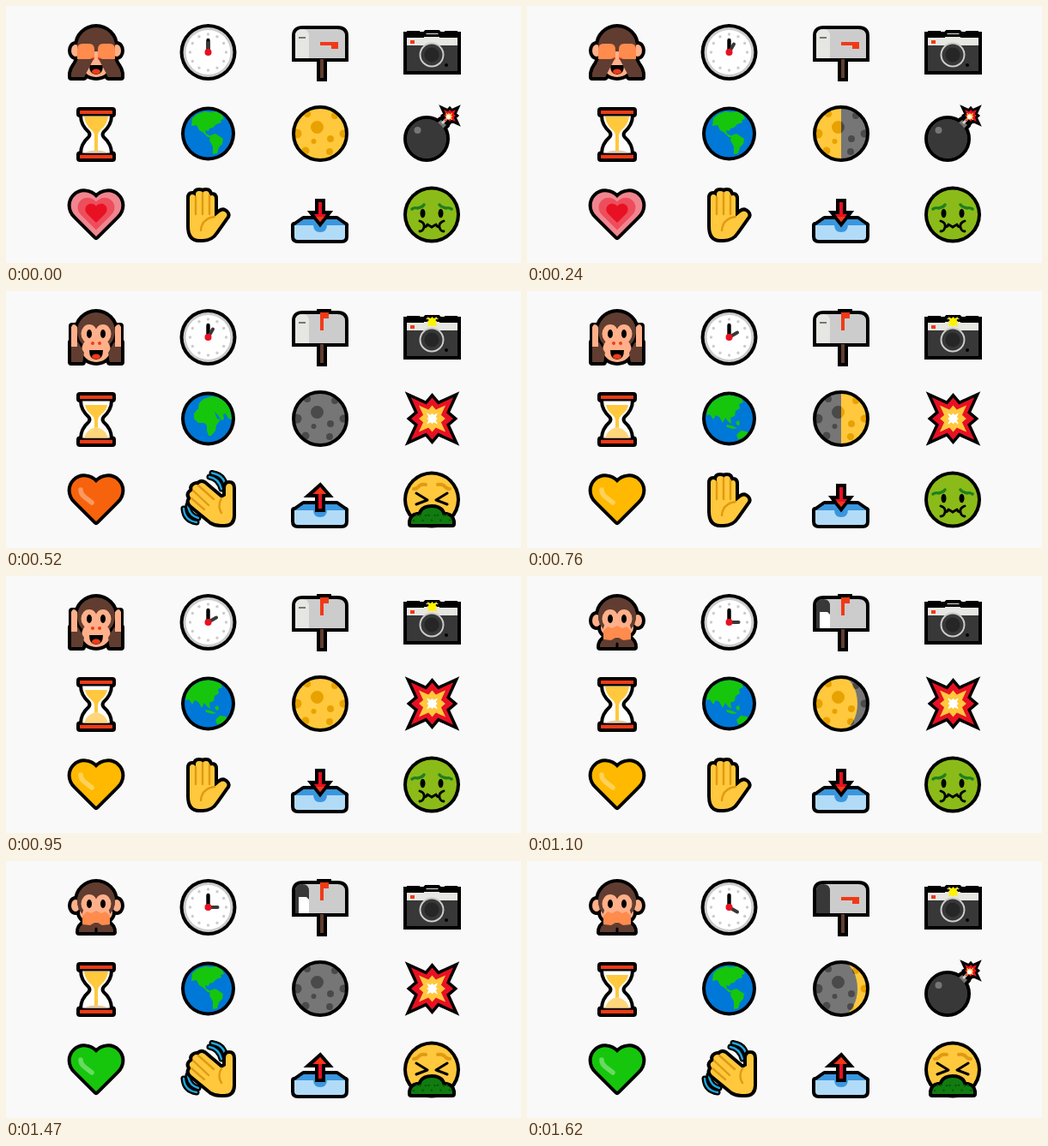
Write an HTML page that moves like this. It is 600 by 300 pixels and loops after 1710 ms.

```html
<!DOCTYPE html>
<html lang="en">
<head>
<meta charset="utf-8">
<title>Emoji cycles</title>
<style>
html, body { margin: 0; width: 100%; height: 100%; overflow: hidden; background: #f9f9f9; }
svg { display: block; width: 600px; height: 300px; }
</style>
</head>
<body>
<svg id="stage" viewBox="0 0 600 300" xmlns="http://www.w3.org/2000/svg"></svg>
<script>
const LOOP = 1710;
const RED = '#e81123', SCARLET = '#f03a17', YELLOW = '#ffc83d', AMBER = '#e09a12';
const GREEN = '#16c60c', DARK = '#383838', GREY = '#ccc', PALE = '#e6e6e2';
const BROWN = '#603d30', PEACH = '#ffb08a', ORANGE = '#ff8b4d', BLUE = '#0078d7';

// Path and markup helpers
const oval = (x, y, rx, ry = rx) =>
  `M${x - rx} ${y}a${rx} ${ry} 0 1 0 ${2 * rx} 0a${rx} ${ry} 0 1 0 ${-2 * rx} 0z`;
const box = (x, y, w, h) => `M${x} ${y}h${w}v${h}h${-w}z`;
const fill = (d, color, attrs = '') => `<path d="${d}" fill="${color}" ${attrs}/>`;
const line = (d, color, width, cap = 'round') =>
  `<path d="${d}" fill="none" stroke="${color}" stroke-width="${width}" stroke-linecap="${cap}" stroke-linejoin="round"/>`;
const inked = (parts, width = 8, join = 'round') =>
  parts.map(([d]) => fill(d, '#000', `stroke="#000" stroke-width="${width}" stroke-linejoin="${join}"`)).join('') +
  parts.map(([d, color]) => fill(d, color)).join('');
const mirror = (markup, x) =>
  markup + `<g transform="translate(${2 * x} 0) scale(-1 1)">${markup}</g>`;

function burst(x, y, reach) {
  const radii = [0.7, 0.51, 1, 0.51];
  return 'M' + Array.from({ length: 16 }, (_, i) => {
    const a = i * Math.PI / 8, r = reach * radii[i % 4];
    return `${(x + r * Math.cos(a)).toFixed(1)} ${(y + r * Math.sin(a)).toFixed(1)}`;
  }).join('L') + 'z';
}

function monkeys() {
  const head = [oval(105, 47, 22), BROWN];
  const ears = [[oval(81, 52, 5, 7), PEACH], [oval(129, 52, 5, 7), PEACH]];
  const eyes = fill(oval(97, 50, 3, 5) + oval(113, 50, 3, 5), '#000');
  const mask = fill(oval(97, 50, 9.5, 11) + oval(113, 50, 9.5, 11), PEACH);
  const muzzle = fill(oval(105, 68, 16.5, 15), PEACH);
  const nose = fill(oval(101, 61, 2) + oval(109, 61, 2), SCARLET);
  const mouth = fill('M97 69h16q0 11-8 11t-8-11z', '#000') + fill(oval(105, 76.5, 5, 3), SCARLET);

  const coverArm = 'M76 83V79Q77 73 81 68L86 58L102 62L91 83z';
  const see = inked([...ears, head, [oval(105, 68, 17, 15), BROWN], [coverArm, BROWN],
    ['M134 83V79Q133 73 129 68L124 58L108 62L119 83z', BROWN]]) + muzzle + nose + mouth +
    mirror(fill(coverArm, BROWN) + fill('M83 62V51q0-7 6-7h8q6 0 6 7v8l-5 3z', ORANGE), 105);

  const sideArm = 'M76 83V60h8l7 12-2 11z';
  const hear = inked([head, [oval(105, 68, 17, 15), BROWN], [box(77, 41, 5, 42), BROWN],
    [box(128, 41, 5, 42), BROWN], [sideArm, BROWN], ['M134 83V60h-8l-7 12 2 11z', BROWN]]) +
    muzzle + mask + eyes + nose + mouth +
    mirror(fill(sideArm, BROWN) + fill('M76 65V42q1-3 3-3t4 3v23z', PEACH), 105);

  const speak = inked([...ears, head, [oval(105, 60, 19, 13), PEACH],
    ['M85 83q0-7 7-11h26q7 4 7 11z', BROWN]]) + fill(head[0], BROWN) +
    fill(oval(105, 62, 16, 11), PEACH) + mask + eyes +
    fill('M85 83q0-7 7-11h26q7 4 7 11H111l-6-5-6 5z', BROWN) + line('M105 79v6', '#000', 3) +
    fill('M89 74V64l5-5 5 2 6-3 6 3 5-2 5 5v10l-9 1-7-4-7 4z', ORANGE);
  return [see, hear, speak];
}

function clocks() {
  const x = 235.5, y = 54;
  const polar = (angle, r) => [x + r * Math.sin(angle), y - r * Math.cos(angle)];
  const dots = Array.from({ length: 12 }, (_, i) => oval(...polar(i * Math.PI / 6, 21), 1.7)).join('');
  const face = fill(oval(x, y, 33), '#000') + fill(oval(x, y, 29), GREY) +
    fill(oval(x, y, 26), '#fff') + fill(dots, GREY) + line(`M${x} ${y}V40`, '#000', 4.4);
  return [0, 1, 2, 3, 4].map(hour =>
    face + line(`M${x} ${y}L${polar(hour * Math.PI / 6, 11)}`, DARK, 4) +
    fill(oval(x, y, 4), RED));
}

function mailboxes() {
  const shell = 'M337 61V35q0-8 9-8h40q9 0 9 8v26z';
  const door = 'M337 61V35q0-8 8-8t8 8v26z';
  const post = [box(366, 62, 4, 22), BROWN];
  const slot = fill(box(341, 36, 8, 2), '#767676');
  const down = fill('M366 42h21v8h-8v-4h-13z', SCARLET);
  const up = fill('M366 25h10v7h-6v14h-4z', SCARLET);
  const bump = fill(box(362, 21, 17, 6), '#000');
  const letter = fill('M341 42h9l3 3v16h-12z', '#fff');
  const base = inked([post, [shell, GREY]], 8, 'miter');
  const closed = fill(door, PALE) + slot, open = fill(door, DARK);
  return [base + closed + down, bump + base + closed + up,
    bump + base + open + letter + up, base + open + down];
}

function cameras() {
  const body = inked([['M467 34h4v-1h7v1h10l2-2h13l2 2h10v-1h7v1h4v42h-59z', PALE]], 8, 'miter') +
    fill(box(467, 46, 59, 30), DARK) + fill(box(471, 40, 5, 4), SCARLET) +
    fill(box(467, 33, 59, 4), '#000') + fill(box(487, 36, 18, 5), PALE) +
    fill(oval(496, 57, 14.5), GREY) + fill(oval(496, 57, 12.5), DARK) +
    fill(oval(496, 57, 8.5), '#262626') + fill(oval(513, 69, 2), '#000');
  return [body, body + fill(burst(496.5, 36, 8.5), '#fff100')];
}

function hourglasses() {
  const glass = 'M89 128h32q0 10-9 18-3 4 0 8 9 8 9 18H89q0-10 9-18 3-4 0-8-9-8-9-18z';
  const frame = inked([[glass, '#fff'], [box(86, 122, 38, 4), SCARLET], [box(86, 173.5, 38, 4.5), SCARLET]]) +
    fill(box(86, 126, 38, 2.5), '#000') + fill(box(86, 171.5, 38, 2), '#000');
  const stream = fill(box(103, 145, 4, 24), YELLOW);
  const full = frame + fill('M91 129h28q-1 9-8 15-4 3-4 8h-4q0-5-4-8-7-6-8-15z', YELLOW) +
    stream + fill('M91 171.5q6-3 14-3t14 3z', '#e8c9a2');
  const spent = frame + fill('M92 133h26q-1 6-7 11-4 3-4 8h-4q0-5-4-8-6-5-7-11z', YELLOW) +
    stream + fill('M91 171.5q2-9 14-13 12 4 14 13z', '#ffd67a');
  return [full, spent];
}

function globes() {
  const x = 235.5, y = 149;
  const lands = [
    'M217 131l6-5 9-3 6 1 7-1 7 4 2 5-4 1 1 3-6 2-4 4-4 1-1 3-4-1 1 4 4 2 3 3-5-1-5-5-5-3-3-6-6 1z' +
      'M238 151l6-2 9 6-1 6-4 4-2 7-5 1v-9l-4-7z',
    'M225 131l5-5 9-3 8 1 8 5 6 8 2 13-4-1-3-6-3 1 1 6-3 1-4-6-4-4-4 2-5-2-4-2-5 2-1-5z' +
      'M219 143l4-5 8-1 4 3 8 1 3 8 4 1-5 7-1 6-5 6h-3l-2-6v-6l-3-3h-7l-5-5z',
    'M210 138l6-9 10-6 10-2 14 4 2 5-5 2 1 5-5 3-1 6-5 2 1 7-4-3-3-4-3 6-4-7-4-2-3 5-4-6-4 1z' +
      'M232 156l6 1 7 3-5 1-7-2zM243 153l4-2 1 5-3 1zM244 168l5-5 7 1 3 3-5 5-8 1z'
  ];
  return lands.map(d => fill(oval(x, y, 31.5), '#000') + fill(oval(x, y, 27.5), BLUE) +
    `<g clip-path="url(#globe)">${fill(d, GREEN)}</g>`);
}

function moons() {
  const x = 366, y = 149, r = 31;
  const craters = oval(362.5, 141.5, 7.5) + oval(339, 149, 5.5) + oval(378, 155, 4) + oval(358.5, 158, 3) +
    oval(351, 126, 4) + oval(383, 128, 4) + oval(393, 149, 4.5) + oval(349, 169, 4.5) + oval(377, 170, 4);
  const disc = (base, spot) => fill(oval(x, y, r), base) + fill(craters, spot);
  const ring = line(oval(x, y, r), '#000', 4);
  // The shadow lies between the rim and an elliptical terminator.
  const shadow = phase => {
    const left = phase > 4, step = left ? 8 - phase : phase;
    const rx = [0, 19, 0, 19, r][step], rim = left ? 0 : 1;
    const back = step > 2 ? rim : 1 - rim;
    return `M${x} ${y - r}A${r} ${r} 0 0 ${rim} ${x} ${y + r}` +
      (rx ? `A${rx} ${r} 0 0 ${back} ${x} ${y - r}z` : 'z');
  };
  return Array.from({ length: 8 }, (_, phase) => {
    const lit = disc(YELLOW, '#e8a200');
    const dark = phase ? `<clipPath id="dark${phase}"><path d="${shadow(phase)}"/></clipPath>` +
      `<g clip-path="url(#dark${phase})">${disc('#767676', '#4a4a4a')}</g>` : '';
    return `<g clip-path="url(#moon)">${lit}${dark}</g>${ring}`;
  });
}

function bombs() {
  const spark = burst(517, 128, 9.5);
  const bomb = inked([[spark, RED]], 6, 'miter') +
    line('M508 138l4-6', '#000', 11, 'butt') +
    inked([[oval(490, 155, 23), DARK], ['M503 136l4-3 6 6-4 4z', '#767676']]) +
    fill(oval(490, 155, 23), DARK) + line('M509 136l5-5', '#d9d4c5', 3) +
    fill(spark, RED) + fill(burst(516, 129, 6), YELLOW) + fill(oval(515.5, 129.5, 2.5), '#fff') +
    fill(oval(479.5, 145, 4), '#767676');
  const boom = inked([[burst(496.5, 149, 35), RED]], 7, 'miter') +
    fill(burst(496.5, 149, 22), YELLOW) + fill(burst(496.5, 149, 9), '#fff');
  return [bomb, boom];
}

function hearts() {
  const d = 'M105 269L81 245C74 238 74 228 80 222C87 215 98 216 105 224C112 216 123 215 130 222C136 228 136 238 129 245Z';
  const layer = (size, color) =>
    `<g transform="translate(105 241) scale(${size}) translate(-105 -241)">${fill(d, color)}</g>`;
  const plain = color => inked([[d, color]]) +
    `<g opacity=".35">${line('M87 232q0 5 4 8l9 7', '#fff', 5.5)}</g>`;
  return [inked([[d, '#f0858f']]) + layer(0.73, '#ee4d5c') + layer(0.43, RED),
    plain('#f7630c'), plain('#ffb900'), plain(GREEN)];
}

function hands() {
  const open = 'M214 257V224q0-4 3-4t4 3v-3q0-4 4-4t4 2q1-2 4-2 4 0 4 5v2q1-2 3-2 3 0 3 4v21' +
    'l6-5q4-3 7 0t0 6l-12 17q-5 8-15 8h-4q-11 0-11-15z';
  const raised = inked([[open, YELLOW]]) +
    line('M221 223v20M229 219v24M237 221v22M243 246q-15 2-16 16', AMBER, 2.4);
  const tilted = 'M239 269L216 250q-4-4-1-7l1-1q-4-4-1-7l3-2q-2-4 1-6 3-2 5 0 2-5 7-2' +
    'l20 17 5-3v-9q0-5 4-5t4 5v32q0 10-10 10h-4q-6 0-11-3z';
  const arcs = 'M237 217q11 2 14 14M240 212.5q14 2 16 16M212 250q1 12 12 15M207 254q1 14 15 16';
  const waving = line(arcs, '#000', 7) + line(arcs, '#1fa8e0', 2.4) + inked([[tilted, YELLOW]]) +
    line('M224 227l18 16M218 233l18 17M216 242l15 13M251 242q-5 9 0 17', AMBER, 2.4);
  return [raised, waving];
}

function trays() {
  const back = 'M347 249h38l10 7h-58z';
  const base = inked([[back, '#3a96dd'], ['M336 256h59v13q0 4-4 4h-51q-4 0-4-4z', '#b2dbf7']]) +
    fill(back, '#3a96dd') + fill('M358 255h16q0 9-8 9t-8-9z', '#3a96dd');
  const down = 'M364 229h4v14h5l-7 9-7-9h5z', up = 'M366 229l7 8h-5v17h-4v-17h-7z';
  return [base + inked([[down, RED]], 8, 'miter') + fill('M361 246h10l-5 6z', SCARLET),
    base + inked([[up, RED]], 8, 'miter') + fill('M366 229l7 8h-14z', SCARLET)];
}

function faces() {
  const x = 496, y = 243.5;
  const head = color => fill(oval(x, y, 33), '#000') + fill(oval(x, y, 29), color);
  const sick = head('#8bbb18') + mirror(
    fill(oval(485.5, 242, 3, 5.2), '#000') +
    line('M473 237q3-2 6-1 6-1 8-4', '#1f7f1f', 3.4) +
    line('M482 251q6 2 5 7t-5 5M487 258q3 0 4-3l5 3', '#000', 2.8), x);
  const puddle = 'M472 272v-3q1-6 7-7h4q2-9 13-9t13 9h4q6 1 7 7v3z';
  const lumps = Array.from({ length: 13 }, (_, i) =>
    oval(475 + i * 3.5, 268 - 7 * Math.abs(Math.sin(i * 2.1)), 1.3)).join('');
  const vomit = head(YELLOW) + mirror(
    line('M475 231q3 0 5-2 3-4 9-3', AMBER, 4) +
    line('M478 236l13 8-13 5', '#000', 3), x) +
    inked([[puddle, '#107c10']]) + fill(lumps, '#0b5a0b');
  return [sick, vomit];
}

// Each cycle: its pictures and the moments (ms) at which it moves on.
const HALF = [290, 760, 1290], SLOW = [430, 1000, 1570];
const cycles = [
  [monkeys(), [520, 1100]],
  [clocks(), [190, 670, 1100, 1570]],
  [mailboxes(), SLOW],
  [cameras(), SLOW],
  [hourglasses(), SLOW],
  [globes(), HALF],
  [moons(), [100, 240, 330, 480, 570, 710, 860, 950, 1100, 1240, 1330, 1470, 1620]],
  [bombs(), [520, 1570]],
  [hearts(), HALF],
  [hands(), HALF],
  [trays(), HALF],
  [faces(), HALF]
];

const stage = document.getElementById('stage');
stage.innerHTML = `<defs><clipPath id="globe"><path d="${oval(235.5, 149, 27.5)}"/></clipPath>` +
  `<clipPath id="moon"><path d="${oval(366, 149, 31)}"/></clipPath></defs>` +
  cycles.map(([pictures]) => `<g class="cycle">${pictures.map(p => `<g>${p}</g>`).join('')}</g>`).join('');
const groups = [...stage.querySelectorAll('.cycle')];

function render(t) {
  cycles.forEach(([pictures, times], i) => {
    const current = times.filter(time => time <= t).length % pictures.length;
    [...groups[i].children].forEach((g, n) => g.setAttribute('visibility', n === current ? 'visible' : 'hidden'));
  });
}

function tick() {
  render(performance.now() % LOOP);
  requestAnimationFrame(tick);
}
tick();
</script>
</body>
</html>
```
